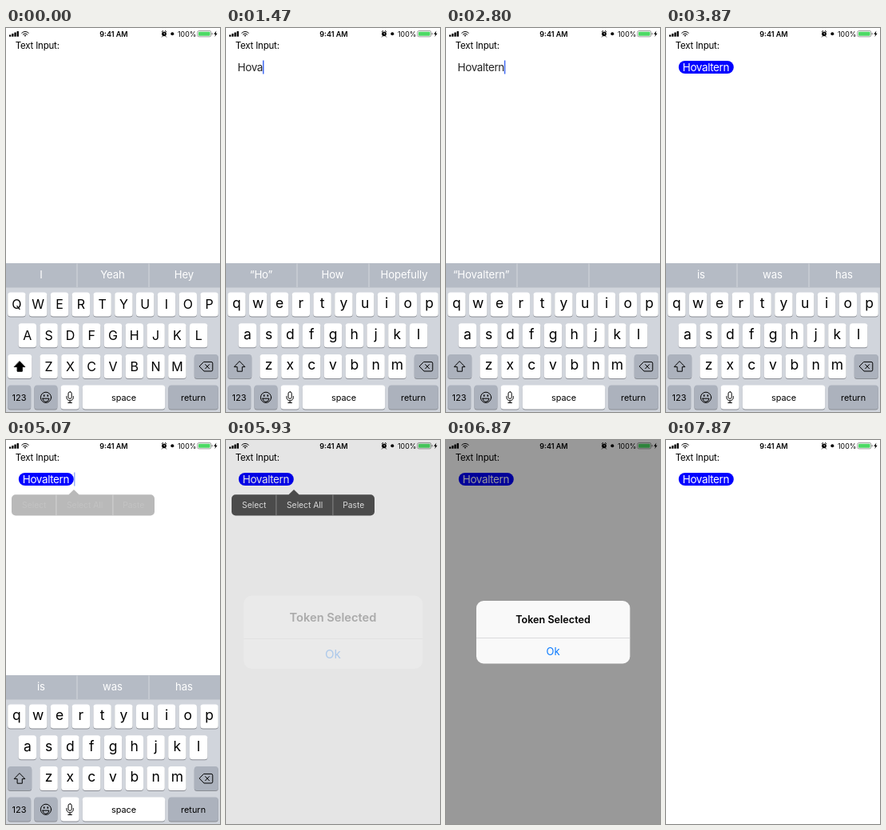
Recreate the animation shown at these times as an HTML page. Size 268 px wide and 480 px high, loop 8000 ms.

```html
<!DOCTYPE html>
<html lang="en">
<head>
<meta charset="utf-8">
<title>Text input token</title>
<style>
  html, body { margin: 0; width: 100%; height: 100%; overflow: hidden; background: #fff; }
  svg { display: block; width: 100%; height: 100%; font-family: Inter, Roboto, sans-serif; }
  text { white-space: pre; }
  .mid { text-anchor: middle; }
  .entry { font-size: 13.5px; letter-spacing: -.4px; }
  .line { fill: none; stroke: #000; stroke-width: 1; stroke-linecap: round; stroke-linejoin: round; }
</style>
</head>
<body>
<svg id="stage" viewBox="0 0 268 480" preserveAspectRatio="none"></svg>
<script>
const LOOP = 8000;
const WORD = 'Hovaltern';
const TYPED_AT = [600, 1050, 1330, 1440, 1850, 2030, 2200, 2390, 2560];
const PRESS = 90;
const RETURN_DOWN = 3050, TOKEN_AT = 3180;
const SUGGESTIONS = [
  [0, 'I', 'Yeah', 'Hey'],
  [720, '“H”', 'He', 'How'],
  [1150, '“Ho”', 'How', 'Hopefully'],
  [1600, '“Hova”', '', ''],
  [2670, `“${WORD}”`, '', ''],
  [3300, 'is', 'was', 'has'],
];
const KEY_W = 22.4, KEY_H = 30, PITCH = 26.8, ROW_Y = [330.5, 369.2, 407.9, 446.6];
const GRAY_KEY = '#acb2bd';

const stage = document.getElementById('stage');

function add(parent, tag, attrs = {}, text = '') {
  const node = document.createElementNS('http://www.w3.org/2000/svg', tag);
  for (const name in attrs) node.setAttribute(name, attrs[name]);
  if (text) node.textContent = text;
  parent.appendChild(node);
  return node;
}
const group = (parent = stage) => add(parent, 'g');
const rect = (parent, x, y, width, height, fill, rx = 0) =>
  add(parent, 'rect', { x, y, width, height, fill, rx });
const path = (parent, d, attrs = { class: 'line' }) => add(parent, 'path', { d, ...attrs });
const label = (parent, x, y, size, text, attrs = {}) =>
  add(parent, 'text', { x, y, 'font-size': size, class: 'mid', ...attrs }, text);

const clamp = v => Math.max(0, Math.min(1, v));
const ramp = (t, start, length) => clamp((t - start) / length);
const smooth = p => p * p * (3 - 2 * p);
const show = (node, visible) => { node.style.display = visible ? '' : 'none'; };

rect(stage, 0, 0, 268, 480, '#fff');

function buildStatusBar() {
  const bar = group();
  for (let i = 0; i < 4; i++) rect(bar, 4 + i * 3.2, 8.4 - i * 1.5, 2.3, 2.4 + i * 1.5, '#000', .4);
  path(bar, 'M19.8 6.2Q24 2.5 28.2 6.2M21.4 8Q24 5.8 26.6 8', { class: 'line', 'stroke-width': 1.5 });
  path(bar, 'M22.6 9.2Q24 8.2 25.4 9.2L24 10.8z', {});
  label(bar, 135, 10.6, 9, '9:41 AM', { 'font-weight': 600 });
  add(bar, 'circle', { cx: 198, cy: 7.3, r: 2.9 });
  path(bar, 'M195.2 4.6l1.3-1.1M200.8 4.6l-1.3-1.1M196 10.5l-.6.6M200 10.5l.6.6');
  path(bar, 'M198 5.8v1.6h1.2', { fill: 'none', stroke: '#fff', 'stroke-width': .7 });
  add(bar, 'circle', { cx: 208.3, cy: 7.2, r: 2 });
  label(bar, 226.7, 10.6, 8.8, '100%');
  add(bar, 'rect', { x: 239.8, y: 3.5, width: 17, height: 7.4, rx: 1.8, fill: '#fff', stroke: '#777', 'stroke-width': .7 });
  rect(bar, 241, 4.7, 14.6, 5, '#4cd964', .9);
  rect(bar, 257.5, 5.9, 1.1, 2.6, '#777', .5);
  path(bar, 'M263.4 3.5l-3.2 4.2h2l-.8 3.3 3.3-4.3h-2z', {});
}
buildStatusBar();
add(stage, 'text', { x: 11.7, y: 25.7, 'font-size': 11.5, 'letter-spacing': '-.2' }, 'Text Input:');

const typed = add(stage, 'text', { x: 14.6, y: 54, class: 'entry', fill: '#222' });
const token = group();
rect(token, 15.8, 41, 69, 16, '#00f', 8);
add(token, 'text', { x: 20.8, y: 54, class: 'entry', fill: '#fff' }, WORD);
const caret = rect(stage, 0, 40.5, 1.5, 17, '#426bf2');

// Keyboard
const keyboard = group();
rect(keyboard, 0, 294, 268, 186, '#d1d5dc');
rect(keyboard, 0, 294, 268, 30.5, '#b5bbc5');
for (const x of [88.5, 178.5]) rect(keyboard, x, 294.5, 1, 29.5, '#d3d7de');
const suggestionLabels = [44, 133.5, 223].map(x =>
  label(keyboard, x, 313.2, 13.2, '', { fill: '#fff', 'letter-spacing': '-.1' }));

function key(x, row, width, fill = '#fff') {
  rect(keyboard, x, ROW_Y[row] + 1, width, KEY_H, '#8a8d94', 3.5);
  return rect(keyboard, x, ROW_Y[row], width, KEY_H, fill, 3.5);
}

const letterKeys = {};
['qwertyuiop', 'asdfghjkl', 'zxcvbnm'].forEach((letters, row) => {
  [...letters].forEach((letter, i) => {
    const x = PITCH * (i + [.5, 1, 2][row]);
    key(x - KEY_W / 2, row, KEY_W);
    const cap = label(keyboard, x, 0, 16, '');
    letterKeys[letter] = { x, row, cap };
  });
});

const shiftKey = key(2.2, 2, 30, GRAY_KEY);
const shiftArrow = path(keyboard, 'M17.2 416.8l6.6 6.8h-3.5v5.6h-6.2v-5.6h-3.5z');
key(235.8, 2, 30, GRAY_KEY);
path(keyboard, 'M248 417.4h9a1.8 1.8 0 0 1 1.8 1.8v8a1.8 1.8 0 0 1-1.8 1.8h-9l-5.6-5.8zM249.6 420.6l5 5.2m0-5.2l-5 5.2');
key(2.2, 3, 29, GRAY_KEY);
label(keyboard, 16.6, 466, 11, '123');
key(35.4, 3, 29, GRAY_KEY);
add(keyboard, 'circle', { cx: 50, cy: 461.8, r: 6.6, class: 'line' });
path(keyboard, 'M46 463.2h8q-.6 4-4 4t-4-4z');
for (const cx of [47.7, 52.3]) add(keyboard, 'ellipse', { cx, cy: 459.6, rx: .8, ry: 1.3 });
key(68.6, 3, 23);
add(keyboard, 'rect', { x: 78, y: 454.8, width: 4.2, height: 8.6, rx: 2.1, class: 'line' });
path(keyboard, 'M75.9 460.5v1.2a4.2 4.2 0 0 0 8.4 0v-1.2M80.1 466v2.4M77.8 468.5h4.6');
key(95.8, 3, 103.4);
label(keyboard, 147.5, 465.6, 10.9, 'space');
const returnKey = key(203.4, 3, 62.4, GRAY_KEY);
label(keyboard, 234.6, 465.6, 10.9, 'return');

const popup = group(keyboard);
const popupShape = path(popup, 'M-11.2 30V3Q-19-3-19-9V-34Q-19-40-13-40H13Q19-40 19-34V-9Q19-3 11.2 3V30z',
  { fill: '#fff', stroke: '#b4b8bf', 'stroke-width': .6 });
const popupLetter = label(popup, 0, -10, 25, '');

// Edit menu
const menu = group();
path(menu, 'M12 68.3H78.5L85 62L91.5 68.3H181a5 5 0 0 1 5 5V89.5a5 5 0 0 1-5 5H12a5 5 0 0 1-5-5V73.3a5 5 0 0 1 5-5z',
  { fill: '#535353' });
for (const x of [62.5, 133.5]) rect(menu, x, 68.3, .8, 26.2, '#a5a5a5');
const menuText = group(menu);
[[35.3, 'Select'], [98.7, 'Select All'], [159.7, 'Paste']].forEach(([x, text]) =>
  label(menuText, x, 85.2, 10.3, text, { fill: '#f2f2f2' }));

// Alert
const dim = rect(stage, 0, 0, 268, 480, '#000');
const alertBox = group();
rect(alertBox, 38, 201, 192.4, 78.5, '#f9f9f9', 9);
rect(alertBox, 38, 247, 192.4, .7, '#cfcfd2');
label(alertBox, 134, 228.7, 12.6, 'Token Selected', { 'font-weight': 600 });
label(alertBox, 134, 268.6, 13, 'Ok', { fill: '#0a7aff' });

let shifted = null;
function setShift(on) {
  if (on === shifted) return;
  shifted = on;
  for (const [letter, { row, cap }] of Object.entries(letterKeys)) {
    cap.textContent = on ? letter.toUpperCase() : letter;
    cap.setAttribute('font-size', on ? 16 : 17.5);
    cap.setAttribute('y', ROW_Y[row] + (on ? 20.8 : 19.4));
  }
  shiftKey.setAttribute('fill', on ? '#fff' : GRAY_KEY);
  shiftArrow.style.fill = on ? '#000' : 'none';
}

function drawTyping(t) {
  const count = TYPED_AT.filter(at => at <= t).length;
  const tokenized = t >= TOKEN_AT;
  typed.textContent = tokenized ? '' : WORD.slice(0, count);
  show(token, tokenized);
  setShift(count === 0);

  const end = tokenized ? 85 : count ? 14.6 + typed.getComputedTextLength() : 14.6;
  const solid = t >= TYPED_AT[0] && t < TOKEN_AT;
  const blink = clamp(.5 + 4 * Math.sin((t - 70) / 1000 * 2 * Math.PI));
  caret.setAttribute('x', end);
  caret.style.opacity = t > 5730 ? 0 : solid ? 1 : blink;

  const pressed = TYPED_AT.findIndex(at => t >= at - PRESS && t < at);
  show(popup, pressed >= 0);
  if (pressed >= 0) {
    const { x, row } = letterKeys[WORD[pressed].toLowerCase()];
    popup.setAttribute('transform', `translate(${x} ${ROW_Y[row]})`);
    popupLetter.textContent = WORD[pressed];
  }
  returnKey.setAttribute('fill', t >= RETURN_DOWN && t < TOKEN_AT ? '#fff' : GRAY_KEY);

  const words = SUGGESTIONS.filter(([at]) => at <= t).pop().slice(1);
  suggestionLabels.forEach((node, i) => { node.textContent = words[i]; });
}

function drawOverlays(t) {
  const slide = smooth(ramp(t, 5690, 220));
  keyboard.setAttribute('transform', `translate(0 ${186 * slide})`);
  show(keyboard, slide < 1);

  menu.style.opacity = ramp(t, 4990, 200) * (1 - ramp(t, 5950, 200));
  menuText.style.opacity = ramp(t, 5050, 140);

  const enter = smooth(ramp(t, 5800, 400));
  const visible = enter * (1 - smooth(ramp(t, 7050, 300)));
  dim.style.opacity = .4 * visible;
  alertBox.style.opacity = visible;
  alertBox.setAttribute('transform',
    `translate(134 240.3) scale(${1.22 - .22 * enter}) translate(-134 -240.3)`);
}

function frame() {
  const t = performance.now() % LOOP;
  drawTyping(t);
  drawOverlays(t);
  requestAnimationFrame(frame);
}
frame();
</script>
</body>
</html>
```
